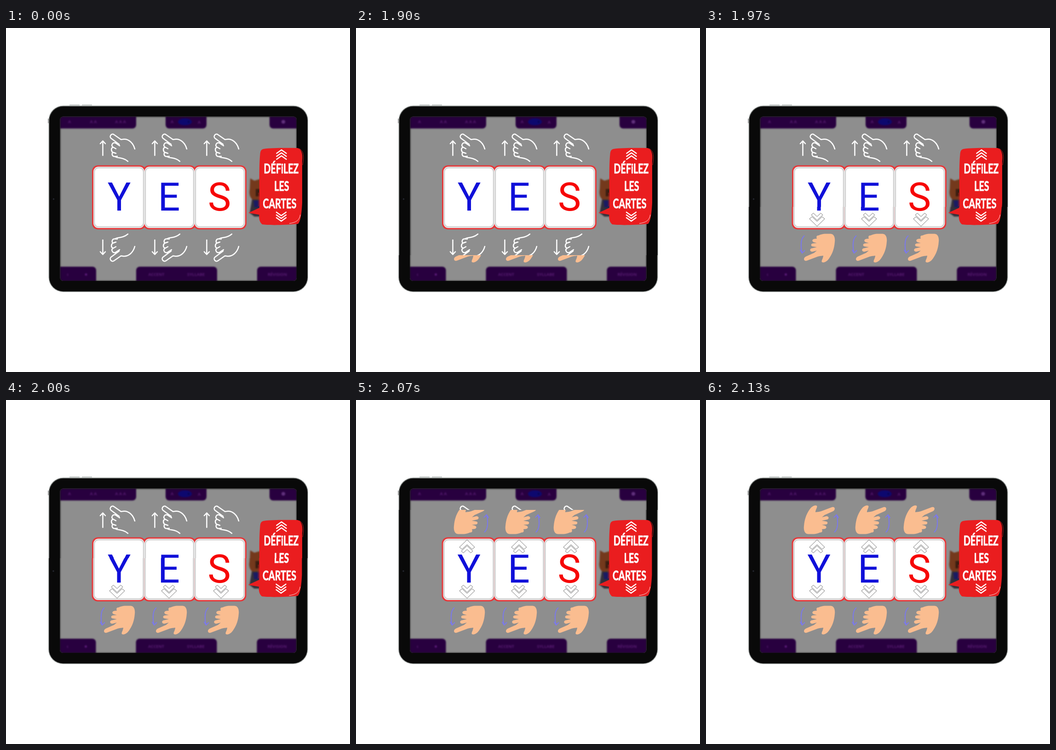
Recreate the animation shown at these times as an HTML page. Size 748 by 748 pixels, loop 3960 ms.

```html
<!DOCTYPE html>
<html lang="fr">
<head>
<meta charset="utf-8">
<title>Défilez les cartes</title>
<style>
html, body { margin: 0; width: 100%; height: 100%; overflow: hidden; background: #fff; }
svg { display: block; width: 100vw; height: 100vh; }
.line { fill: none; stroke: #fff; stroke-width: 2.5; stroke-linecap: round; stroke-linejoin: round; }
.swing { fill: none; stroke: #7b79ec; stroke-width: 2; stroke-linecap: round; stroke-linejoin: round; }
.skin { fill: #fabd90; }
.chevron { fill: #fff; stroke: #4a4a4a; stroke-width: .8; }
.letter { font: 400 84.5px Roboto, Arial, sans-serif; text-anchor: middle; }
.label { font: 700 19.7px Lato, "Open Sans", sans-serif; fill: #fff; stroke: #fff; stroke-width: .6; stroke-linejoin: round; text-anchor: middle; }
.dim { font: 700 9px "Open Sans", sans-serif; fill: #561a70; text-anchor: middle; }
</style>
</head>
<body>
<svg viewBox="0 0 748 748" xmlns="http://www.w3.org/2000/svg">
  <defs>
    <filter id="soft" x="-20%" y="-20%" width="140%" height="140%" color-interpolation-filters="sRGB"><feGaussianBlur stdDeviation="1.7"/></filter>
    <clipPath id="screen"><rect x="117.5" y="192.5" width="514.5" height="357.5" rx="7"/></clipPath>
    <clipPath id="above"><rect id="top" width="748" height="748"/></clipPath>
    <clipPath id="below"><rect id="bottom" y="748" width="748" height="748"/></clipPath>

    <g id="outline">
      <path class="line" d="M280 263C277 251 267 240 254 242L250 242.500L235 232C230 228 224 235 228 239.500L246 253M247 256L238 250C232 248 228 255 232 258.500L239 262.500M233 259.500C227 261 229 269 233 270.500L239 272.500M232 270.500C229 275 232 280 237 279.500L242 279M238 280C244 284 254 280 265 290"/>
      <path class="line" d="M210.500 277V246M205 251.500L210.500 245.500L216 251.500"/>
    </g>
    <g id="hand">
      <path class="skin" d="M274 233C281 231 282 239 276 242L258 250L252 255L262 252.500C268 253 268 259 263 260L252 262.500L261 264C266 265 265 270 261 270.500L252 271.500L258 273C264 275 262 280 257 280.500L252 281C254 286 252 288 248 288C244 290 240 291 235 291.500H222C214 291 212 282 213 274C214 260 218 248 226 237C231 230 238 228 241 230C243 233 238 238 238 244C242 243 246 243.500 250 242Z"/>
      <path class="swing" d="M279.500 287C288 280 287 262 284 250M278.500 255L284 249.500L288 256"/>
    </g>
    <g id="arrows">
      <path class="chevron" d="M225 415L230.500 410.500L241.500 420.500L252.500 410.500L258 415L241.500 431Z"/>
      <path class="chevron" d="M229 406.500L233.500 402.500L241.500 410L249.500 402.500L254 406.500L241.500 418Z"/>
    </g>

    <g id="tablet">
      <path d="M138 167.500H160M165 167.500H187" stroke="#b9bfbd" stroke-width="2"/>
      <path d="M92 197V207" stroke="#777" stroke-width="1.500"/>
      <rect x="92.500" y="168.500" width="564.500" height="405.800" rx="32" fill="#b4b9b7"/>
      <rect x="93.500" y="169.700" width="562.500" height="403.500" rx="31" fill="#3c3e3d"/>
      <rect x="94.500" y="171" width="560.500" height="401.300" rx="30" fill="#090909"/>
      <circle cx="103.500" cy="372" r="1.800" fill="#252730"/>
      <g clip-path="url(#screen)">
        <rect x="117" y="192" width="516" height="359" fill="#8e8e8e"/>
        <g filter="url(#soft)">
          <g id="tabs" fill="#28003f"></g>
          <ellipse cx="389" cy="204" rx="15" ry="7.500" fill="#0d086f"/>
          <circle cx="397" cy="204" r="2" fill="#07064c"/>
          <circle cx="603" cy="204" r="4" fill="#60307c"/>
          <g id="dims"></g>
          <circle cx="174" cy="536" r="2.500" fill="#5b1a78"/>
          <path d="M535 372H554V410H540L530 402Z" fill="#33303a"/>
          <path d="M531 327L540 332L554 328V373H536C530 368 528 360 530 350Z" fill="#74391c"/>
          <path d="M543 350H554V366H543Z" fill="#3a1d10"/>
          <path d="M538 375H554V390H540Z" fill="#1b1a62"/>
        </g>
        <rect x="117" y="192" width="516" height="359" rx="7" fill="none" stroke="#181818" stroke-width="2.500" filter="url(#soft)"/>
      </g>
      <g id="cards"></g>
      <path fill="#ea1d1f" d="M560 263C580 260 620 261 634 261C643 263 646 275 644 290L644 380C643 400 641 420 635 426C600 429 570 429 557 427C550 421 550 412 550.500 406L527 402L551 391C551 340 550 300 552.500 275C553 267 555 264 560 263Z"/>
      <path fill="none" stroke="#c01a1c" d="M637 262C648 267 648 281 645 298M549 358V388"/>
      <path fill="none" stroke="#fff" stroke-width=".8" d="M640 406C638 418 631 423 616 425"/>
      <g id="labels"></g>
      <path class="line" d="M588.500 272.500L599 265L609.500 272.500M588.500 279L599 271.500L609.500 279M588.500 285.500L599 278L609.500 285.500"/>
      <path class="line" d="M588 400.500L598.500 408L609 400.500M588 406.500L598.500 414L609 406.500M588 412.500L598.500 420L609 412.500"/>
    </g>
  </defs>

  <g clip-path="url(#above)"><use href="#tablet"/><g id="before"></g></g>
  <g clip-path="url(#below)"><use href="#tablet" x="-.5"/><g id="after"></g></g>
</svg>
<script>
const byId = id => document.getElementById(id);
const fill = (id, parts) => { byId(id).innerHTML = parts.join(''); };
const use = (id, transform) => `<use href="#${id}" transform="${transform}"/>`;
const box = (x, y, w, h, r, look) =>
  `<rect x="${x}" y="${y}" width="${w}" height="${h}" rx="${r}" ${look}/>`;

// Tabs run past the screen edge so only their inner corners look rounded.
fill('tabs', [
  [100, 180, 183, 38.5], [347, 180, 89, 38.5], [573, 180, 80, 38.5],
  [100, 519, 96, 50], [283, 519, 176, 50], [546, 519, 100, 50]
].map(([x, y, w, h]) => box(x, y, w, h, 8, '')));

fill('dims', [
  ['A', 138, 207], ['A A', 190, 207], ['A A A', 249, 207], ['A', 361, 207], ['A', 420, 208],
  ['ı', 134, 539], ['ACCENT', 327, 539], ['SYLLABE', 413, 539], ['RÉVISION', 590, 539]
].map(([word, x, y]) => `<text class="dim" x="${x}" y="${y}">${word}</text>`));

const cards = [
  { x: 190, w: 111, word: 'Y', mid: 246, ink: '#1010d9' },
  { x: 301, w: 109, word: 'E', mid: 354.5, ink: '#1010d9' },
  { x: 410, w: 110, word: 'S', mid: 464, ink: '#f60505' }
];
fill('cards', [
  ...cards.map(c => box(c.x - 3, 298.5, c.w + 6, 139.5, 13, 'fill="#e5383a"')),
  ...cards.map(c => box(c.x, 301.5, c.w, 133.5, 11, 'fill="#f2f2f2"')),
  ...cards.map(c => box(c.x + 2, 304, c.w - 4, 128.5, 9,
    'fill="#fff" stroke="#d2d2d2" stroke-width="2.5"')),
  ...cards.map(c => `<text class="letter" x="${c.mid}" y="397" fill="${c.ink}">${c.word}</text>`)
]);

// Tall, narrow lettering
fill('labels', [['DÉFiLEZ', 598.5, 316], ['LES', 599.5, 354], ['CARTES', 595, 392]]
  .map(([word, x, y]) =>
    `<text class="label" transform="translate(${x} ${y}) scale(1 1.42)">${word}</text>`));

const columns = [0, 113, 226];
fill('before', columns.flatMap(x => [
  use('outline', `translate(${x})`),
  use('outline', `translate(${x} 738) scale(1 -1)`)
]));
fill('after', [
  ...[0, 112, 217].map(x => use('hand', `translate(${x})`)),
  ...columns.flatMap(x => [
    use('hand', `translate(${x + 493} 739) rotate(180)`),
    use('arrows', `translate(${x})`),
    use('arrows', `translate(${x} 735) scale(1 -1)`)
  ])
]);

// The second picture wipes in from the bottom edge.
const LOOP = 3960, SIZE = 748, WIPE_START = 1730, WIPE_TIME = 500;
const steps = [1870, 1900, 1930, 1970, 2000, 2030, 2070, 2100, 2130];

// Whole pixels keep the seam between the two pictures invisible.
function edgeAt(t) {
  if (t < steps[0]) return SIZE;
  if (t >= steps[steps.length - 1]) return 0;
  const step = steps.filter(s => s <= t).pop();
  return Math.round(SIZE * (1 - (step - WIPE_START) / WIPE_TIME));
}

function draw() {
  const y = edgeAt(performance.now() % LOOP);
  byId('top').setAttribute('height', y);
  byId('bottom').setAttribute('y', y);
  requestAnimationFrame(draw);
}
draw();
</script>
</body>
</html>
```
